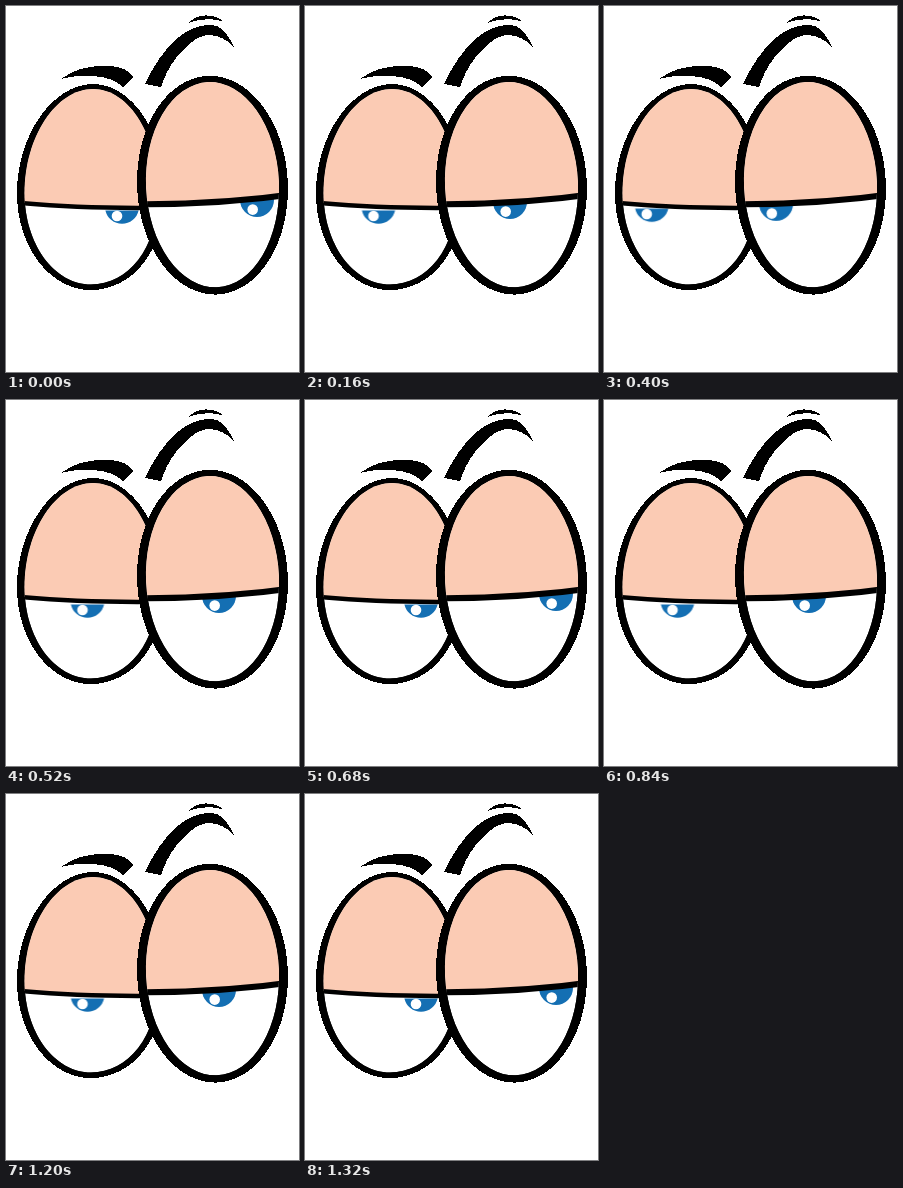
An HTML page for the animation above (1.36 s loop, 293 by 366 pixels).

```html
<!DOCTYPE html>
<html lang="en">
<head>
<meta charset="utf-8">
<title>Shifty eyes</title>
<style>
  html, body { margin: 0; width: 100%; height: 100%; overflow: hidden; background: #fff; }
  svg { display: block; width: 293px; height: 366px; }
  .ink { shape-rendering: crispEdges; }
  .white { fill: #fff; }
  .lid { fill: #fbcbb4; stroke: #000; }
  .iris { fill: #146fb3; }

  /* One glance is 17 ticks of 40 ms; each leg moves in whole ticks. */
  .look { animation: 680ms -1ms infinite; }
  .left { animation-name: look-left; }
  .right { animation-name: look-right; }

  @keyframes look-left {
    0%      { transform: translate(116px, 201px); animation-timing-function: steps(4); }
    23.529% { transform: translate(73.5px, 201px); animation-timing-function: steps(3); }
    41.176% { transform: translate(45px, 201px); animation-timing-function: steps(1); }
    47.058% { transform: translate(36.5px, 198.5px); animation-timing-function: steps(1); }
    52.941% { transform: translate(36.5px, 198.5px); animation-timing-function: steps(4); }
    76.470% { transform: translate(81.5px, 201px); animation-timing-function: steps(3); }
    94.117%, 100% { transform: translate(116px, 201px); animation-timing-function: steps(1); }
  }
  @keyframes look-right {
    0%      { transform: translate(251px, 194px); animation-timing-function: steps(4); }
    23.529% { transform: translate(205px, 196px); animation-timing-function: steps(3); }
    41.176% { transform: translate(180px, 196px); animation-timing-function: steps(1); }
    47.058% { transform: translate(158.5px, 198.5px); animation-timing-function: steps(1); }
    52.941% { transform: translate(158.5px, 198.5px); animation-timing-function: steps(4); }
    76.470% { transform: translate(213px, 196px); animation-timing-function: steps(3); }
    94.117%, 100% { transform: translate(251px, 194px); animation-timing-function: steps(1); }
  }
</style>
</head>
<body>
<svg viewBox="0 0 293 366">
  <defs>
    <path id="ballL" d="M18.500 187C18.500 131 50 83 87 83S152 131 152 187S122 278.500 85 278.500S18.500 238 18.500 187Z"/>
    <ellipse id="ballR" cx="206.500" cy="178.700" rx="66.500" ry="102.700" transform="rotate(-2.500 206.500 178.700)"/>
    <clipPath id="clipL"><use href="#ballL"/></clipPath>
    <clipPath id="clipR"><use href="#ballR"/></clipPath>
  </defs>

  <g class="ink">
    <path d="M55 73C68 63 84 59 104 60Q121 61 127 71L117 81Q106 71 87 70Q70 69 55 73Z"/>
    <path d="M139 78C148 59 159 42 173 31C185 21 199 17 211 20Q221 25 228 41Q216 29 203 29C191 29 179 41 170 52Q160 65 155 81Z"/>
    <path d="M182 17.500Q189 9.500 199 9.500Q211 9 217 15.500Q208 12.500 199 13.500Q189 14 182 17.500Z"/>
  </g>

  <path class="ink" d="M11 187C11 129 47 78 87 78S159 129 159 187S126 284 85 284S11 241 11 187Z"/>
  <g clip-path="url(#clipL)">
    <use class="white" href="#ballL"/>
    <g class="look left">
      <path class="iris" d="M-16.600 3.500H16.600A17 17 0 0 1 -16.600 3.500Z"/>
      <circle class="white" cx="-5" cy="9" r="5.300"/>
    </g>
    <path class="lid" stroke-width="4.500" d="M0 195.500Q70 203.500 170 201.500V60H0Z"/>
  </g>

  <ellipse class="ink" cx="206.500" cy="179.200" rx="75.400" ry="109.400" transform="rotate(-2.500 206.500 179.200)"/>
  <g clip-path="url(#clipR)">
    <use class="white" href="#ballR"/>
    <g class="look right">
      <circle class="iris" r="17"/>
      <circle class="white" cx="-4.300" cy="9.600" r="5.300"/>
    </g>
    <path class="lid" stroke-width="6" d="M120 198Q210 199.500 293 187.500V50H120Z"/>
  </g>
</svg>
</body>
</html>
```
